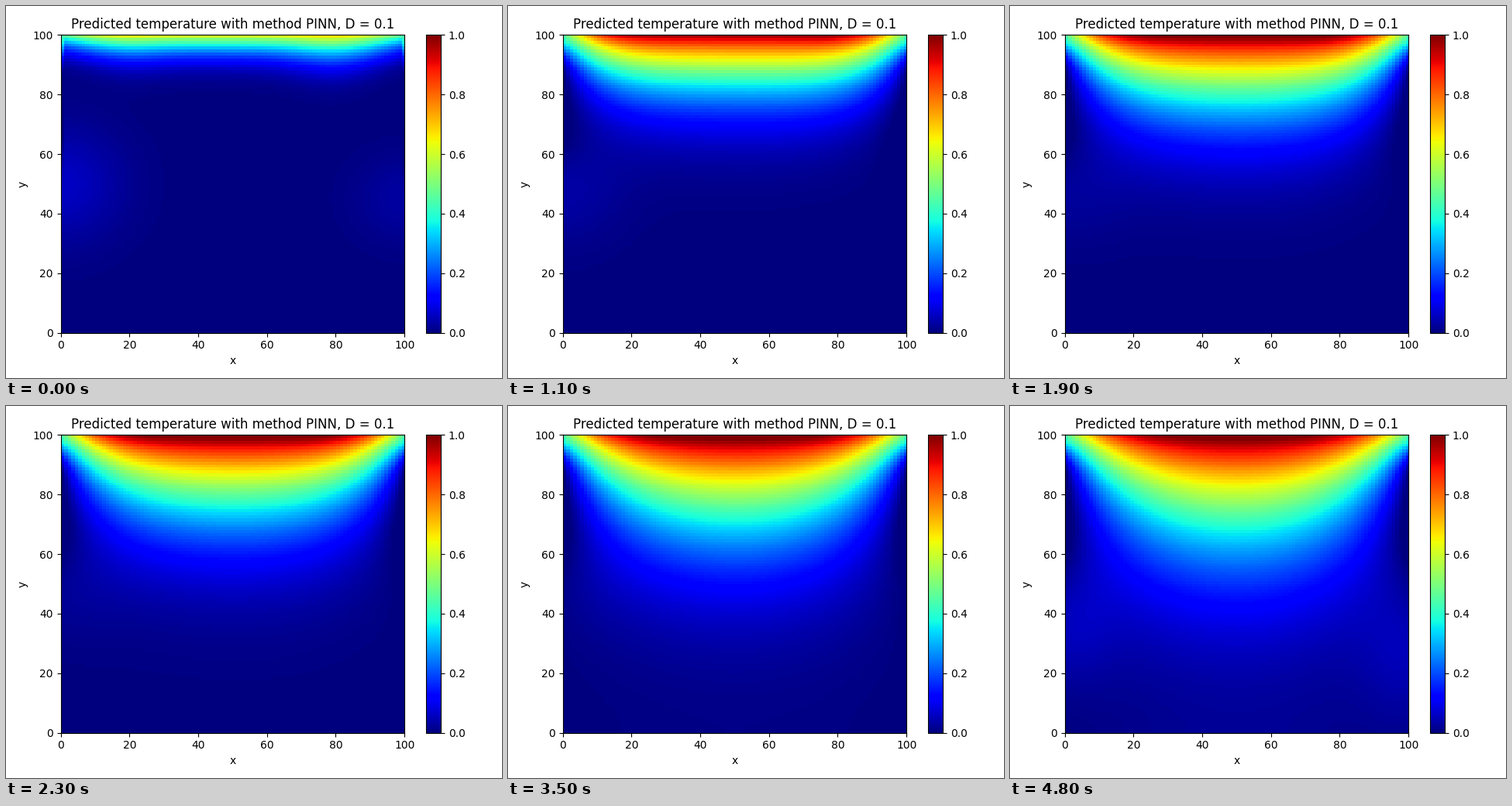
Recreate the animation shown at these times as a matplotlib script. Size 640 by 480 pixels, loop 4.9 s.

```python
import math

import matplotlib.pyplot as plt
import numpy as np
from matplotlib.animation import FuncAnimation

N = 100             # grid cells per side
FRAMES = 49
INTERVAL = 100      # ms
SUBSTEPS = 100      # diffusion steps per frame
KAPPA = 0.0185      # diffusivity per second
DX = 1 / N
DT = INTERVAL / 1000 / SUBSTEPS
CORNER = 0.43       # temperature at the top corners

x = (np.arange(N) + 0.5) / N
y = x[:, None]
d = 1 - y           # depth below the hot edge
edge = np.minimum(x, 1 - x)
erfc = np.vectorize(math.erfc)


def bell(v, center, width):
    return np.exp(-((v - center) / width) ** 2)


def top_edge(t):
    bumps = 0.07 * bell(x, 0.8, 0.12) + 0.035 * bell(x, 0.18, 0.1)
    level = 1.03 - 0.43 * math.exp(-t / 0.6) + bumps * math.exp(-t / 1.5)
    width = 0.08 + 0.009 * t
    return level - (level - CORNER) * np.exp(-(edge / width) ** 1.2)


def start_field():
    depth = 0.1 + 0.025 * bell(x, 0.8, 0.15) + 0.008 * bell(x, 0.2, 0.1)
    depth = depth * (1 - 0.25 * np.exp(-edge / 0.1))
    return top_edge(0) * erfc(d / depth)


def wall_spots(t):
    """Faint warm patches along the side walls."""
    early = 0.061 * math.exp(-t / 2.4)
    late = 0.05 * np.clip((t - 3.9) / 0.9, 0, 1) ** 1.5
    left = early * bell(x, 0, 0.18) * bell(y, 0.5, 0.195)
    left = left + late * bell(x, 0, 0.14) * bell(y, 0.35, 0.2)
    right = 0.031 * math.exp(-t / 0.5) * bell(x, 1, 0.15) * bell(y, 0.45, 0.15)
    right = right + late * bell(x, 1, 0.14) * bell(y, 0.28, 0.25)
    return left + right


def simulate():
    wall = (CORNER * bell(d, 0, 0.072) - 0.035 * bell(d, 0.3, 0.14))[:, 0]
    rate = KAPPA * DT / DX ** 2
    u = start_field()
    fields = []
    for frame in range(FRAMES):
        t = frame * INTERVAL / 1000
        u[:, 0] = u[:, -1] = wall
        u[-1] = top_edge(t)
        fields.append(u + wall_spots(t))
        for _ in range(SUBSTEPS):
            mid = u[1:-1, 1:-1]
            mid += rate * (u[2:, 1:-1] + u[:-2, 1:-1]
                           + u[1:-1, 2:] + u[1:-1, :-2] - 4 * mid)
            u[0] = u[1]  # insulated floor
    return fields


fields = simulate()

fig, ax = plt.subplots(figsize=(6.4, 4.8), dpi=100)
image = ax.imshow(fields[0], cmap="jet", vmin=0, vmax=1, origin="lower",
                  extent=(0, 100, 0, 100), aspect="auto",
                  interpolation="nearest")
ax.set_title("Predicted temperature with method PINN, D = 0.1")
ax.set_xlabel("x")
ax.set_ylabel("y")
fig.colorbar(image, ax=ax)
fig.tight_layout()


def update(frame):
    image.set_data(fields[frame])
    return (image,)


anim = FuncAnimation(fig, update, frames=FRAMES, interval=INTERVAL,
                     repeat=True, repeat_delay=0)
plt.show()
```
